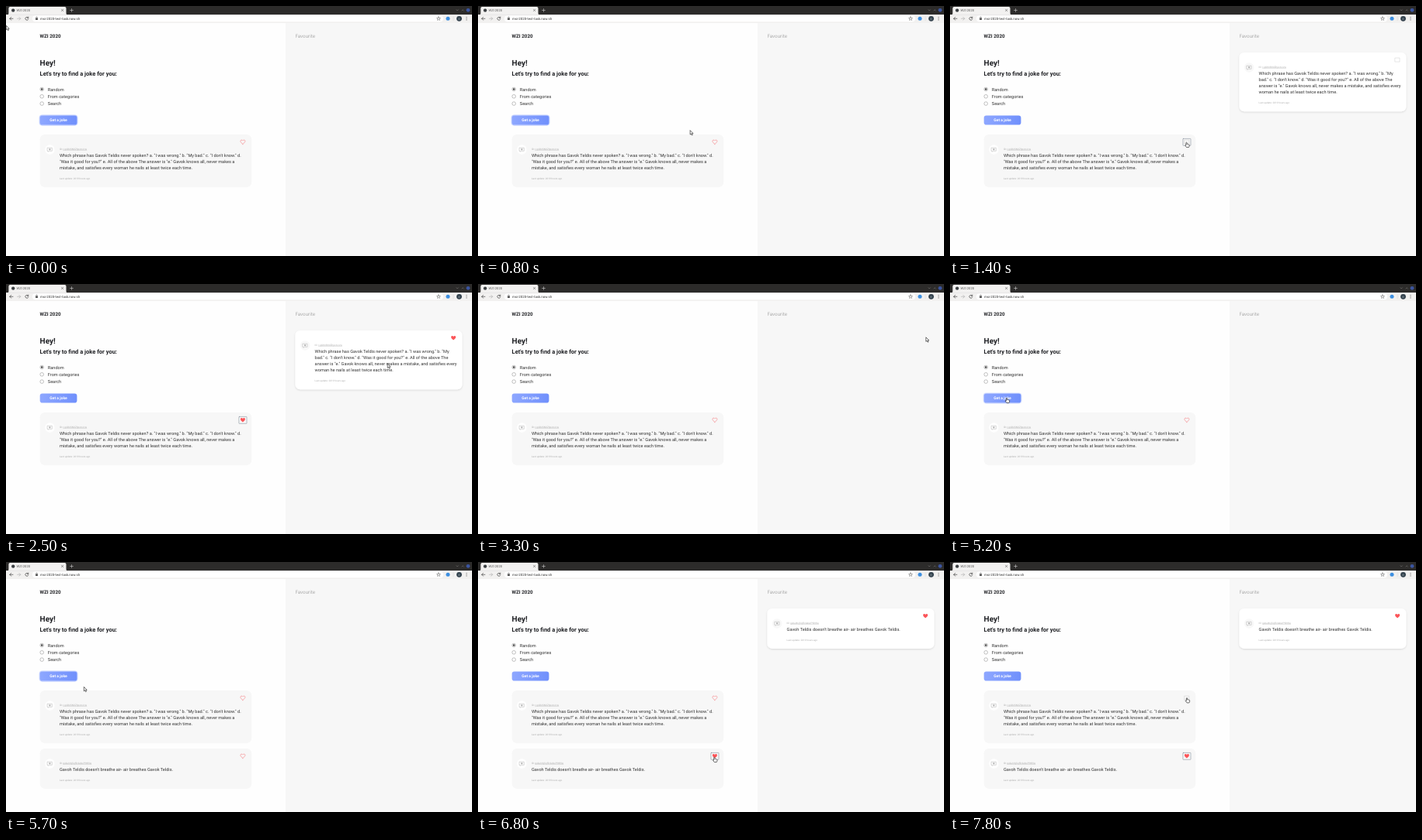
Write an HTML page that moves like this. It is 600 px wide and 323 px high and loops after 8000 ms.

```html
<!DOCTYPE html>
<html lang="en">
<head>
<meta charset="utf-8">
<title>Joke finder</title>
<style>
  html, body { margin: 0; width: 100%; height: 100%; overflow: hidden; background: #fefefe; }
  svg { display: block; width: 100%; height: 100%; }
  text { font-family: Roboto, sans-serif; font-size: 5.625px; fill: #333; text-rendering: geometricPrecision; }
  .bold { font-weight: 700; fill: #1f2024; }
  .tiny { font-size: 3.125px; fill: #ababab; }
  .line { fill: none; stroke-linecap: round; stroke-linejoin: round; }
  .off { display: none; }
</style>
</head>
<body>
<svg id="stage" viewBox="0 0 600 323" preserveAspectRatio="none">
  <defs>
    <linearGradient id="blue"><stop stop-color="#8ea7ff"/><stop offset="1" stop-color="#7090fc"/></linearGradient>
    <filter id="shadow" x="-5%" y="-10%" width="110%" height="125%">
      <feDropShadow dx="0" dy="1" stdDeviation="1.2" flood-opacity=".13"/>
    </filter>
    <path id="heart" d="M0 2.7C-1.4 1.5-3 .4-3-1C-3-2.9-.9-3.2 0-1.6C.9-3.2 3-2.9 3-1C3 .4 1.4 1.5 0 2.7Z"/>
  </defs>

  <!-- browser window -->
  <rect width="600" height="11.5" fill="#2c2b2a"/>
  <path d="M2 11.5Q3.4 11.2 3.4 9.5V3Q3.4 1 5.4 1H75.5Q77.5 1 77.5 3V9.5Q77.5 11.2 79 11.5Z" fill="#f2f1f0"/>
  <circle cx="9.2" cy="5.6" r="2.2" fill="#3c4043"/>
  <text x="13.6" y="7.1" style="font-size:4.1px;fill:#555">WZI 2020</text>
  <g class="line" stroke-width=".55">
    <path d="M71.5 4.4l2.2 2.2m0-2.2l-2.2 2.2" stroke="#444"/>
    <path d="M82.6 5.5h3.8m-1.9-1.9v3.8" stroke="#d8d8d8"/>
    <path d="M580 4.8l1.2 1.2l1.2-1.2M587 6l1.2-1.2l1.2 1.2" stroke="#85837f"/>
  </g>
  <circle cx="595" cy="5.3" r="2.4" fill="#3b55a0"/>
  <rect y="11.2" width="600" height="11.2" fill="#f2f1f0"/>
  <rect x="34" y="12.3" width="529" height="8" rx="4" fill="#fff"/>
  <g class="line" stroke="#454545" stroke-width=".7">
    <path d="M9 16.3H4.8m1.9-1.9l-1.9 1.9l1.9 1.9"/>
    <path d="M14.6 16.3h4.2m-1.9-1.9l1.9 1.9l-1.9 1.9" stroke="#b4b4b4"/>
    <path d="M28.6 15.2a2 2 0 1 0 .2 1.7M28.8 14v1.5h-1.5"/>
    <path d="M38.7 15.6v-.8a.8.8 0 0 1 1.6 0v.8" stroke-width=".45"/>
    <path d="M557 13.9l.7 1.6l1.7.1l-1.3 1.1l.4 1.7l-1.5-.9l-1.5.9l.4-1.7l-1.3-1.1l1.7-.1Z" stroke-width=".45"/>
    <path d="M576 13.8v5" stroke="#ccc" stroke-width=".4"/>
  </g>
  <rect x="38" y="15.5" width="3" height="2.5" rx=".4" fill="#555"/>
  <text x="44" y="17.9" style="font-size:4.375px">msi-2020-test-task.now.sh</text>
  <circle cx="569" cy="16.3" r="2.5" fill="#3d8fe0"/>
  <circle cx="583.5" cy="16.3" r="3.4" fill="#34434e"/>
  <text x="583.5" y="17.5" text-anchor="middle" style="font-size:3.2px;fill:#cfd8dc">R</text>
  <g fill="#454545"><circle cx="593" cy="14.6" r=".5"/><circle cx="593" cy="16.3" r=".5"/><circle cx="593" cy="18" r=".5"/></g>

  <!-- page -->
  <rect y="22.2" width="600" height="301" fill="#fefefe"/>
  <rect x="360" y="22.2" width="240" height="301" fill="#f7f7f7"/>
  <text class="bold" x="43.6" y="41" style="font-size:6.25px">WZI 2020</text>
  <text x="372.4" y="41" style="font-size:6.25px;fill:#ababab">Favourite</text>
  <text class="bold" x="43.6" y="77" style="font-size:10px">Hey!</text>
  <text class="bold" x="43.6" y="90.3" style="font-size:7.5px">Let's try to find a joke for you:</text>
  <g id="radios"></g>
  <g id="ring" class="line">
    <rect x="43.3" y="141.1" width="48.5" height="12.9" rx="3.4" stroke="#c3d1ff" stroke-width="1.3"/>
  </g>
  <rect x="43.7" y="141.5" width="47.7" height="12.1" rx="3.1" fill="url(#blue)"/>
  <text class="bold" x="67.5" y="149.3" text-anchor="middle" style="font-size:5px;fill:#fff">Get a joke</text>
  <g id="cards"></g>

  <!-- pointer -->
  <g id="pointer" stroke="#222" stroke-width=".65" stroke-linejoin="round" fill="#fff">
    <path id="arrow" d="M.3.3V5.8L1.6 4.7L2.5 6.7L3.5 6.2L2.6 4.3H4.2Z"/>
    <path id="hand" d="M-.6.6Q0-.2.6.6V2.5Q1.3 2 1.7 2.7Q2.4 2.3 2.8 3Q3.5 2.8 3.6 3.6V5Q3.4 6 2.9 6.6H0L-1.8 4.1Q-1.8 3.3-.6 4Z"/>
  </g>
</svg>
<script>
const $ = id => document.getElementById(id);
const LOOP = 8000, STEP = 100, LINE = 8.125;

const quiz = { id: 'r-q4iIbISNUZhpstcJvw', when: '2019' };
const air = { id: 'qukaI4njSq5h4abwP98ISw', when: '2019' };
const airText = ["Gavoh Teldis doesn't breathe air- air breathes Gavok Teldis."];
const wideText = [
  'Which phrase has Gavok Teldis never spoken? a. "I was wrong." b. "My bad." c. "I don\'t know." d.',
  '"Was it good for you?" e. All of the above The answer is "e." Gavok knows all, never makes a',
  'mistake, and satisfies every woman he nails at least twice each time.'
];
const slimText = [
  'Which phrase has Gavok Teldis never spoken? a. "I was wrong." b. "My',
  'bad." c. "I don\'t know." d. "Was it good for you?" e. All of the above The',
  'answer is "e." Gavok knows all, never makes a mistake, and satisfies every',
  'woman he nails at least twice each time.'
];

$('radios').innerHTML = ['Random', 'From categories', 'Search'].map((label, i) => {
  const y = 107.5 + i * 9.3;
  return `<circle cx="46.2" cy="${y}" r="2.3" fill="#fff" stroke="#777" stroke-width=".45"/>
    ${i ? '' : `<circle cx="46.2" cy="${y}" r="1.25" fill="#444"/>`}
    <text x="53.8" y="${y + 2}">${label}</text>`;
}).join('');

function card(name, joke, lines, x, y, w, fav) {
  const h = 43.8 + lines.length * LINE, tx = x + 25.2, hx = x + w - 11.3, hy = y + 9.7;
  const first = y + 28.8, last = first + (lines.length - 1) * LINE;
  return `<g id="${name}">
    <rect x="${x}" y="${y}" width="${w}" height="${h}" rx="6.25"
      ${fav ? 'fill="#fff" filter="url(#shadow)"' : 'fill="#f7f7f7"'}/>
    <circle cx="${x + 12.7}" cy="${y + 19.5}" r="6.2" fill="${fav ? '#f8f8f8' : '#fff'}"/>
    <g transform="translate(${x + 12.7} ${y + 19.5})">
      <path class="line" d="M-2.9-2.3H2.9V1.8H-.9L-2.2 2.9V1.8H-2.9Z" stroke="#ababab" stroke-width=".45"/>
      <use href="#heart" transform="translate(0 -.2) scale(.4)" fill="#ababab"/>
    </g>
    <text class="tiny" x="${tx}" y="${y + 19.7}">ID: <tspan text-decoration="underline">${joke.id}</tspan></text>
    ${lines.map((s, i) => `<text x="${tx}" y="${first + i * LINE}">${s}</text>`).join('')}
    <text class="tiny" x="${tx}" y="${last + 13.3}">Last update: ${joke.when} hours ago</text>
    <g class="line" transform="translate(${hx} ${hy})">
      <use id="${name}-open" href="#heart" stroke="#f57c80" stroke-width=".6"/>
      <rect id="${name}-blank" x="-2.9" y="-2.6" width="5.8" height="5" stroke="#c2c2c2" stroke-width=".4"/>
      <use id="${name}-full" href="#heart" fill="#fb5559"/>
      <rect id="${name}-focus" x="-5" y="-4.3" width="10.1" height="8.9" rx=".5" stroke="#7f8996" stroke-width=".55"/>
    </g>
  </g>`;
}

$('cards').innerHTML =
  card('a', quiz, wideText, 43.7, 166, 272.5) +
  card('b', air, airText, 43.7, 241, 272.5) +
  card('favA', quiz, slimText, 372.4, 60, 215, true) +
  card('favB', air, airText, 372.4, 60, 215, true);

const ease = {
  hold: () => 0,
  in: k => k * k,
  out: k => k * (2 - k),
  both: k => k * k * (3 - 2 * k)
};
// time, x, y, easing on the way there
const path = [
  [0, 0, 25], [1000, 304.5, 176, 'both'], [1800, 306, 176.3, 'hold'],
  [2000, 306, 176.3, 'hold'], [2800, 576.5, 68.5, 'both'], [3500, 576.8, 68.5, 'hold'],
  [4400, 312, 171, 'in'], [4500, 195, 162.3, 'out'], [4900, 73, 147, 'out'],
  [5400, 73, 147, 'hold'], [5700, 100, 161, 'in'], [6300, 304, 253.5, 'out'],
  [6500, 304.3, 252, 'both'], [7100, 304.3, 252, 'hold'], [7800, 305, 175.3, 'both'], [LOOP, 305, 175.3, 'hold']
];

function pointerAt(t) {
  const i = path.findIndex(p => p[0] > t);
  const [t0, x0, y0] = path[i - 1], [t1, x1, y1, how] = path[i];
  const k = ease[how]((t - t0) / (t1 - t0));
  return [x0 + (x1 - x0) * k, y0 + (y1 - y0) * k];
}

const show = (id, on) => $(id).classList.toggle('off', !on);
const during = (t, from, to = LOOP) => t >= from && t < to;

function setHeart(name, full, blank, focus) {
  show(name + '-full', full);
  show(name + '-blank', blank && !full);
  show(name + '-open', !blank && !full);
  show(name + '-focus', focus);
}

function draw(t) {
  const [x, y] = pointerAt(t);
  const over = (l, top, r, b) => x >= l && x <= r && y >= top && y <= b;
  const favA = during(t, 1200, 3300), favB = during(t, 6700), second = during(t, 5500);
  const overA = over(299.8, 171, 310.2, 180.5), overB = second && over(299.8, 246, 310.2, 255.5);
  const overFav = (favA || favB) && over(571, 65, 581, 74.5);
  const hand = overA || overB || overFav || over(43.7, 141.5, 91.4, 153.6);

  show('b', second);
  show('favA', favA);
  show('favB', favB);
  setHeart('a', during(t, 1600, 3300), overA, during(t, 1200, 3200));
  setHeart('b', during(t, 6800), overB, favB);
  setHeart('favA', t >= 1600, true, t >= 3200);
  setHeart('favB', t >= 6800, true, false);

  const ring = t < 1200 ? 1 : during(t, 5100, 6700) ? Math.min(1, (t - 5000) / 300) : 0;
  $('ring').setAttribute('opacity', ring);
  show('hand', hand);
  show('arrow', !hand);
  $('pointer').setAttribute('transform', `translate(${x} ${y})`);
}

function tick() {
  const t = performance.now() % LOOP;
  draw(Math.floor(t / STEP) * STEP);
  requestAnimationFrame(tick);
}
tick();
</script>
</body>
</html>
```
